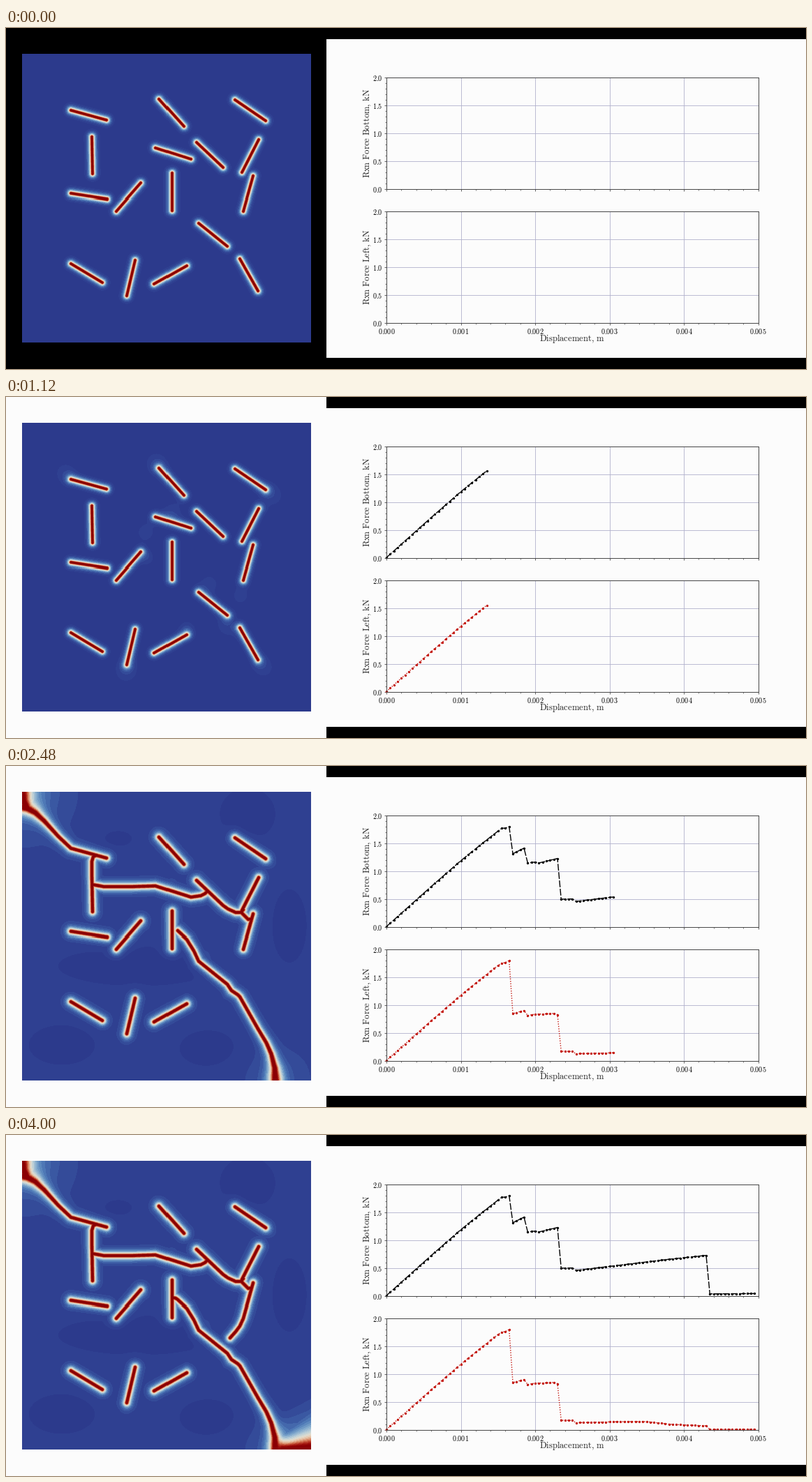
These frames come from a looping animation (1146 px wide and 489 px high, 4.04 s). A matplotlib script:

```python
import numpy as np
import matplotlib.pyplot as plt
from matplotlib.animation import FuncAnimation
from matplotlib.colors import LinearSegmentedColormap
from matplotlib.patches import Rectangle
from matplotlib.ticker import FuncFormatter, MultipleLocator

W, H, DPI = 1146, 489, 100
FRAMES, INTERVAL = 101, 40
PAPER = "#fcfcfc"
INK = "#444444"
STEP = 0.05  # displacement per frame, in mm
X0, Y0, SIDE = 23, 38, 413

plt.rcParams["mathtext.fontset"] = "cm"

# ---------- reaction curves: (displacement in mm, force in kN) ----------
BOTTOM = [(0, 0.01), (0.6, 0.725), (1, 1.19), (1.35, 1.565), (1.5, 1.72),
          (1.55, 1.77), (1.6, 1.775), (1.65, 1.80), (1.7, 1.315),
          (1.85, 1.415), (1.9, 1.15), (2, 1.165), (2.05, 1.15), (2.1, 1.165),
          (2.3, 1.23), (2.35, 0.5), (2.5, 0.505), (2.55, 0.46), (3.05, 0.54),
          (3.8, 0.66), (4.3, 0.73), (4.35, 0.04), (4.95, 0.045)]
LEFT = [(0, 0.01), (0.6, 0.72), (1, 1.18), (1.35, 1.555), (1.5, 1.71),
        (1.55, 1.755), (1.6, 1.765), (1.65, 1.80), (1.7, 0.85), (1.85, 0.905),
        (1.9, 0.815), (2, 0.84), (2.2, 0.845), (2.25, 0.855), (2.3, 0.83),
        (2.35, 0.175), (2.5, 0.17), (2.55, 0.13), (3, 0.145), (3.2, 0.15),
        (3.5, 0.15), (3.8, 0.105), (4, 0.09), (4.3, 0.075), (4.35, 0.01),
        (4.95, 0.012)]

steps = np.arange(FRAMES - 1) * STEP
disp = steps / 1000


def sample(curve):
    xs, ys = zip(*curve)
    return np.interp(steps, xs, ys)


# ---------- damage field ----------
NOTCHES = [
    (93, 119, 144, 133), (219, 103, 254, 142), (327, 104, 371, 134),
    (123, 157, 124, 210), (214, 173, 264, 189), (272, 165, 310, 201),
    (361, 161, 337, 208), (93, 238, 145, 246), (193, 223, 158, 263),
    (237, 209, 237, 262), (353, 213, 339, 263), (275, 280, 316, 313),
    (93, 338, 138, 365), (185, 333, 173, 384), (258, 341, 212, 367),
    (334, 331, 360, 377),
]

# (first step, last step, path)
CRACKS = [
    (31, 34, [(93, 119), (75, 102), (55, 80), (42, 68), (31, 62), (23, 60)]),
    (33, 34, [(31, 62), (25, 52), (22, 40)]),
    (31, 34, [(123, 157), (123, 138), (125, 131), (130, 129)]),
    (31, 34, [(316, 313), (322, 322), (331, 328), (334, 331)]),
    (33, 38, [(360, 377), (372, 397), (379, 413), (384, 433), (385, 451)]),
    (33, 47, [(275, 280), (268, 265), (258, 249), (245, 237)]),
    (36, 47, [(214, 173), (180, 174), (140, 174), (124, 171)]),
    (40, 47, [(264, 189), (278, 187), (284, 184), (288, 180)]),
    (40, 47, [(310, 201), (317, 206)]),
    (40, 47, [(337, 208), (337, 212), (341, 216)]),
    (47, 51, [(317, 206), (328, 211), (335, 211), (339, 207)]),
    (47, 51, [(341, 216), (346, 221), (351, 220)]),
    (66, 81, [(339, 263), (334, 274), (328, 282), (320, 291)]),
    (70, 87, [(245, 237), (242, 235), (237, 234)]),
]

GLOWS = [(85, 110, 16), (215, 95, 17), (380, 142, 18), (238, 165, 14),
         (200, 195, 14), (290, 268, 14), (316, 328, 17), (368, 388, 16),
         (172, 394, 18), (258, 332, 12), (335, 285, 13), (202, 232, 11)]
CALM = [(345, 70, 42, 40), (190, 287, 122, 30), (160, 105, 22, 12),
        (405, 230, 26, 55), (80, 400, 50, 30), (290, 405, 45, 28)]

X, Y = np.meshgrid(np.arange(SIDE, dtype="f4") + X0 + 0.5,
                   np.arange(SIDE, dtype="f4") + Y0 + 0.5)


def ramp(t, a, b):
    return min(max((t - a) / (b - a), 0.0), 1.0)


def seg_dist(x1, y1, x2, y2):
    dx, dy = x2 - x1, y2 - y1
    t = np.clip(((X - x1) * dx + (Y - y1) * dy) / (dx * dx + dy * dy), 0, 1)
    return np.hypot(X - x1 - t * dx, Y - y1 - t * dy)


def path_dist(path, frac):
    """Distance to the first part of a polyline."""
    pts = np.array(path, float)
    spans = np.hypot(*np.diff(pts, axis=0).T)
    left = frac * spans.sum()
    best = None
    for p, q, span in zip(pts[:-1], pts[1:], spans):
        if left <= 1e-6:
            break
        end = p + (q - p) * min(left / span, 1)
        d = seg_dist(float(p[0]), float(p[1]), float(end[0]), float(end[1]))
        best = d if best is None else np.minimum(best, d)
        left -= span
    return best


def bump(cx, cy, rx, ry):
    return np.exp(-((X - cx) / rx) ** 2 - ((Y - cy) / ry) ** 2)


notch_dist = np.min([seg_dist(*n) for n in NOTCHES], axis=0)
glow = np.max([bump(x, y, r, r) for x, y, r in GLOWS], axis=0)
calm = np.max([bump(*c) for c in CALM], axis=0)
haze = 0.050 - 0.035 * calm

corner = np.hypot(X - X0, Y - Y0)
mouth = np.hypot(X - 385, Y - 451)
rise = 451 - Y
wedge = np.clip((X - 380) / 56, 0, 1)
wedge_edge = np.clip((X - 378) / 16, 0, 1)
plateau = np.exp(-(rise / (32 + 32 * wedge)) ** 4) * wedge_edge
torn = np.minimum(1.25 * np.exp(-rise / (6 + 18 * wedge)), 1) * wedge_edge

cache = {}


def crack_dist(k, frac):
    if (k, frac) not in cache:
        cache[k, frac] = path_dist(CRACKS[k][2], frac)
    return cache[k, frac]


def damage(i):
    dist = notch_dist
    for k, (a, b, _) in enumerate(CRACKS):
        frac = ramp(i, a, b)
        if frac > 0:
            dist = np.minimum(dist, crack_dist(k, frac))

    opened = ramp(i, 32, 34)
    split = ramp(i, 36, 38)
    width = 3.2 + 0.5 * ramp(i, 28, 34)
    if opened:
        width = width + 9 * opened * np.exp(-corner / 22)
    if split:
        width = width + 5 * split * np.exp(-mouth / 20)
    core = np.minimum(1.35 * np.exp(-dist / width), 1)

    low = 0.062 * ramp(i, 12, 28) * glow
    low = np.maximum(low, haze * ramp(i, 28, 34))
    if opened:
        low = low + 0.42 * opened * np.exp(-corner / 27)
    if split:
        low = low + 0.16 * split * np.exp(-mouth / 22)
    low = low + 0.10 * ramp(i, 60, 80) * plateau
    if i >= 87:
        low = np.maximum(low, torn)
    return core + np.clip(low, 0, 1) * (1 - core)


TONES = [(0, 44, 58, 140), (0.04, 48, 65, 146), (0.1, 56, 84, 160),
         (0.2, 82, 127, 186), (0.3, 132, 172, 206), (0.4, 186, 207, 216),
         (0.5, 226, 222, 208), (0.6, 230, 188, 158), (0.7, 212, 122, 88),
         (0.8, 182, 52, 34), (0.9, 154, 10, 8), (1, 138, 0, 4)]
cmap = LinearSegmentedColormap.from_list(
    "damage", [(t, (r / 255, g / 255, b / 255)) for t, r, g, b in TONES], N=28)

# ---------- stage ----------
# the small surplus keeps the pixel size from being rounded down
fig = plt.figure(figsize=((W + 0.01) / DPI, (H + 0.01) / DPI), dpi=DPI,
                 facecolor="black")
stage = fig.add_axes([0, 0, 1, 1], zorder=-1)
side = Rectangle((0, 0), 459, H, fc=PAPER, lw=0)
stage.add_patch(side)
stage.add_patch(Rectangle((459, 16), W - 459, 457, fc=PAPER, lw=0))
plate = stage.imshow(np.zeros((SIDE, SIDE)), cmap=cmap, vmin=0, vmax=1,
                     extent=(X0, X0 + SIDE, Y0 + SIDE, Y0),
                     interpolation="nearest", zorder=3)
stage.set(xlim=(0, W), ylim=(H, 0), aspect="auto")
stage.axis("off")


def label(x, y, words, **kw):
    words = words.replace(", ", r",\,").replace(" ", r"\ ")
    stage.text(x, y, rf"$\mathrm{{{words}}}$", size=9.1, ha="center",
               va="center", color="#222222", **kw)


def chart(top, show_x):
    ax = fig.add_axes([545 / W, 1 - (top + 160) / H, 532.5 / W, 160 / H],
                      facecolor=PAPER)
    ax.set(xlim=(0, 0.005), ylim=(0, 2))
    ax.xaxis.set_major_locator(MultipleLocator(0.001))
    ax.xaxis.set_minor_locator(MultipleLocator(0.0002))
    ax.yaxis.set_major_locator(MultipleLocator(0.5))
    ax.yaxis.set_minor_locator(MultipleLocator(0.1))
    ax.xaxis.set_major_formatter(FuncFormatter(lambda v, _: f"${v:.3f}$"))
    ax.yaxis.set_major_formatter(FuncFormatter(lambda v, _: f"${v:.1f}$"))
    ax.tick_params(which="major", length=2.2, width=0.6, pad=1.8,
                   labelsize=7.3, color=INK, labelbottom=show_x)
    ax.tick_params(which="minor", length=1.3, width=0.5, color=INK)
    ax.grid(color="#b0b0cc", lw=0.6)
    ax.set_axisbelow(True)
    for spine in ax.spines.values():
        spine.set(color=INK, lw=0.7)
    return ax


class Trace:
    """A dotted or dashed curve whose newest piece has its own dash."""

    def __init__(self, ax, values, color, old_dash, new_dash):
        self.values = values
        self.old, = ax.plot([], [], color=color, lw=1, ls=old_dash)
        self.new, = ax.plot([], [], color=color, lw=1, ls=new_dash)
        self.dots, = ax.plot([], [], "o", color=color, ms=2.4, mew=0,
                             clip_on=False)

    def show(self, n):
        last = max(n - 2, 0)
        self.old.set_data(disp[:max(n - 1, 0)], self.values[:max(n - 1, 0)])
        self.new.set_data(disp[last:n], self.values[last:n])
        self.dots.set_data(disp[:n], self.values[:n])


upper, lower = chart(71, False), chart(263, True)
traces = [
    Trace(upper, sample(BOTTOM), "black", (0, (7, 1.6)), (0, (3.7, 1.6))),
    Trace(lower, sample(LEFT), "#c3140c", (0, (1, 1.5)), (0, (1, 1.5))),
]
label(518, 151, "Rxn Force Bottom, kN", rotation=90)
label(518, 343, "Rxn Force Left, kN", rotation=90)
label(810.5, 445, "Displacement, m")


def update(frame):
    side.set_visible(frame > 0)
    plate.set_data(damage(frame - 1))
    for trace in traces:
        trace.show(frame)
    return []


anim = FuncAnimation(fig, update, frames=FRAMES, interval=INTERVAL,
                     repeat=True, repeat_delay=0)
plt.show()
```
